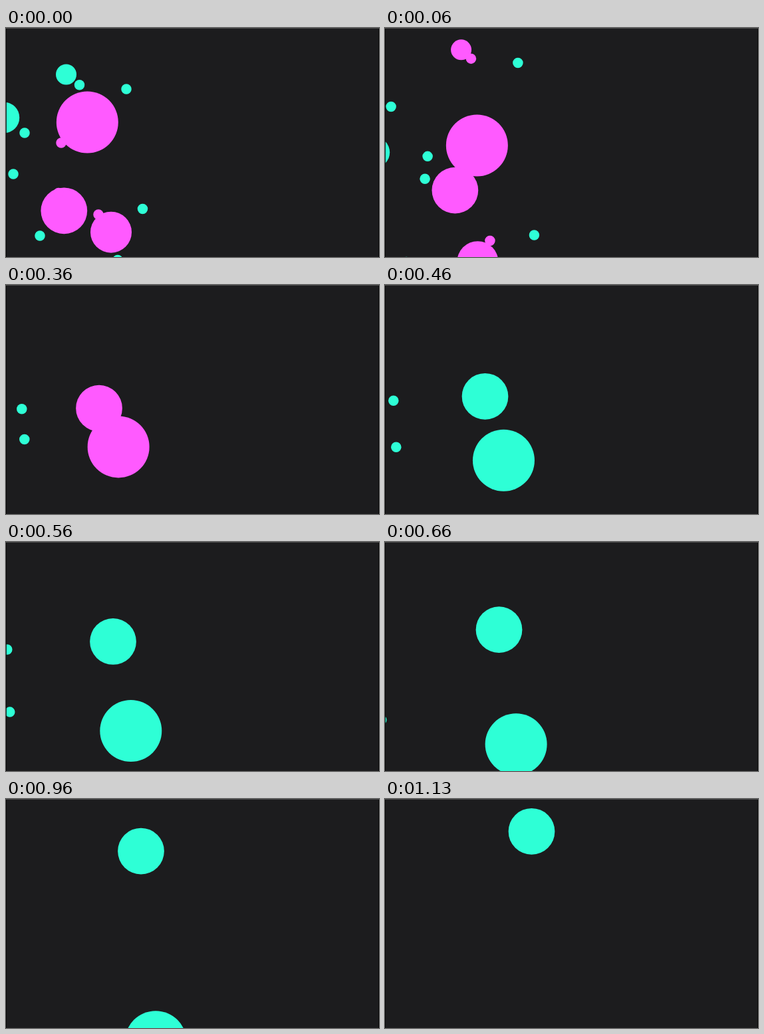
Animation of 561 by 345 pixels, one loop 1160 ms. Source, as an HTML page with a canvas:

```html
<!DOCTYPE html>
<html>
<head>
<meta charset="utf-8">
<title>Colliding circles</title>
<style>
  html, body { margin: 0; width: 100%; height: 100%; overflow: hidden; background: #1c1c1e; }
  canvas { display: block; }
</style>
</head>
<body>
<canvas id="stage" width="561" height="345"></canvas>
<script>
const LOOP = 1160, W = 561, H = 345, UNIT = 7.75;
const MIDDLE = { x: 90, y: 210 };
const ctx = document.getElementById('stage').getContext('2d');

// Velocities are in px per second
const circle = (x, y, size, vx, vy) => ({ x, y, r: size * UNIT, vx, vy });

// Small dots fly apart; those near the middle cross it vertically
function dot([x, y]) {
  const dx = x - MIDDLE.x, dy = y - MIDDLE.y;
  const inner = Math.hypot(dx, dy) < 50;
  return circle(x, y, 1, 110 * Math.sign(dx), inner ? -3.2 * dy : 230 * Math.sign(dy));
}

const dotStarts = [
  [110.5, 85.7], [181, 92], [83, 173], [28, 158], [11, 220],
  [51, 313], [205.5, 272.5], [168, 349.5], [139, 281], [79, 248.5]
];

const circles = [
  circle(122.3, 142, 6, 93.3, 203),
  circle(87.3, 275.3, 4.5, 105, -178.5),
  circle(158, 307.7, 4, -108, 259),
  circle(-3, 135, 3, -76, 304),
  circle(90.5, 70, 2, 140, -216),
  ...dotStarts.map(dot)
];

// The picture steps three times per 100 ms
function stepAt(t) {
  const rest = t % 100;
  return 3 * Math.floor(t / 100) + (rest >= 30) + (rest >= 60);
}

// Seconds of motion at a step: a quick start, a stall, a catch-up, then real time
function motionAt(step) {
  if (step < 7) return 0.086 * Math.min(step, 2);
  if (step < 11) return 0.217 + 0.07125 * (step - 7);
  return 0.502 + (step - 11) / 30;
}

function bar(color, x, y, w, h) {
  ctx.fillStyle = color;
  ctx.fillRect(x, y, w, h);
}

function draw(now) {
  const s = motionAt(stepAt(now % LOOP));
  const placed = circles.map(({ x, y, r, vx, vy }) => ({ x: x + vx * s, y: y + vy * s, r }));
  const touches = a => placed.some(b => a !== b && Math.hypot(a.x - b.x, a.y - b.y) < a.r + b.r);

  bar('#1c1c1e', 0, 0, W, H);
  for (const c of placed) {
    ctx.fillStyle = touches(c) ? '#ff5aff' : '#2effd6';
    ctx.beginPath();
    ctx.arc(c.x, c.y, c.r, 0, 2 * Math.PI);
    ctx.fill();
  }
  bar('#484848', 0, 0, W, 1);
  bar('rgba(0,0,0,.8)', 0, 1, 1, H);
  bar('rgba(0,0,0,.8)', W - 1, 1, 1, H);
}

const start = performance.now();
function tick() {
  draw(performance.now() - start);
  requestAnimationFrame(tick);
}
tick();
</script>
</body>
</html>
```
